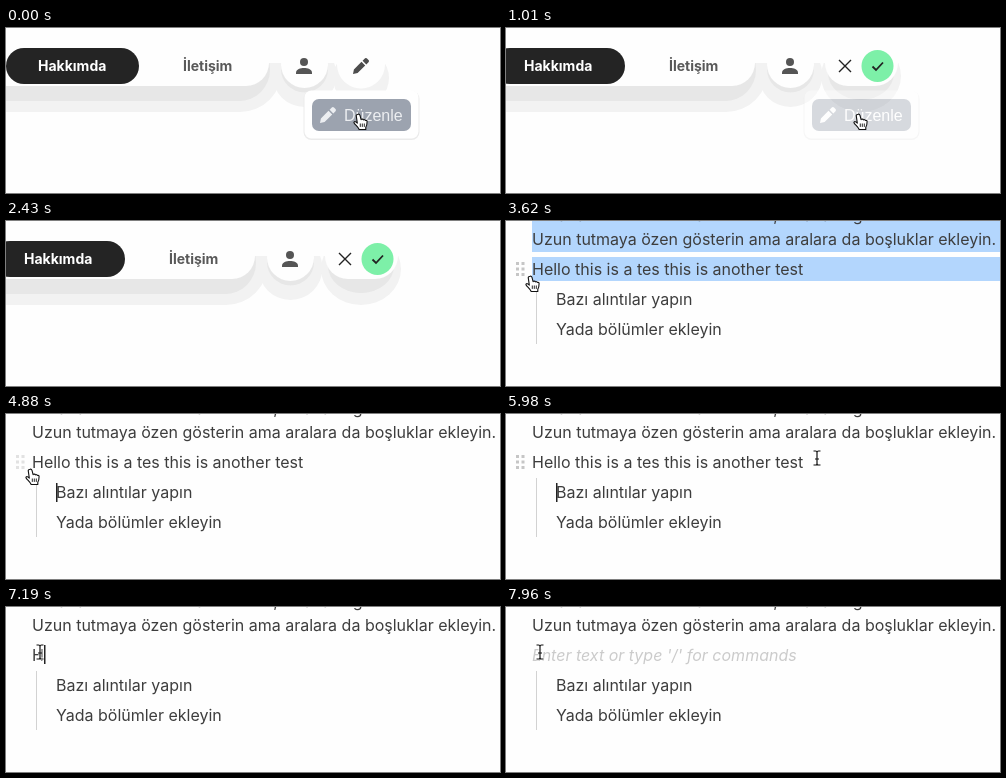
Animation, 494 px wide and 165 px high, one loop 8 s. Source, as an HTML page:

```html
<!DOCTYPE html>
<html lang="tr">
<head>
<meta charset="utf-8">
<title>Editör</title>
<style>
html, body { margin: 0; width: 100%; height: 100%; overflow: hidden; background: #fefefe; }
svg { display: block; width: 494px; height: 165px; font: 16px Inter, sans-serif; fill: #3d3d3d; }

/* One loop is 8 s, so 1% is 80 ms. */
svg [class] { animation: 8s step-end infinite; }

.light { fill: #f2f2f2; }
.dark { fill: #e7e7e7; }
.white { fill: #fefefe; }
.select { fill: #b3d6fd; }
.nav { font-weight: 700; font-size: 14px; }
svg .header { animation-name: header; }
svg .editor { animation-name: editor; }
svg .menu { animation-name: menu; }
svg .label { animation-name: label; }
svg .shift { animation-name: shift; }
svg .edit { animation-name: edit; }
svg .confirm { animation-name: confirm; }
svg .block { animation-name: block; }
svg .drag { animation-name: drag; }
svg .dragged { animation-name: dragged; }
svg .dots { animation-name: dots; }
svg .line { animation-name: line; }
svg .rest { animation-name: rest; }
svg .hint { animation-name: hint; }
svg .toolbar { animation-name: toolbar; }
svg .caret { animation-name: caret; }
svg .pointer { animation-name: pointer; }
svg .hand { animation-name: hand; }
svg .arrow { animation-name: arrow; }
svg .beam { animation-name: beam; }

@keyframes header { 0% { opacity: 1 } 45.25%, 100% { opacity: 0 } }
@keyframes editor { 0% { opacity: 0 } 45.25%, 100% { opacity: 1 } }
@keyframes menu { 0% { opacity: 1 } 12.625% { opacity: .4 } 13.375%, 100% { opacity: 0 } }
@keyframes label { 0% { fill: #eceef1 } .625%, 100% { fill: #fff } }
@keyframes shift { 0% { transform: none } 12.625%, 100% { transform: translate(-14px, 0) } }
@keyframes edit { 0% { opacity: 1 } 12.625%, 100% { opacity: 0 } }
@keyframes confirm { 0% { opacity: 0 } 12.625%, 100% { opacity: 1 } }

@keyframes block { 0% { opacity: 1 } 61%, 100% { opacity: 0 } }
@keyframes drag {
  0% { transform: translate(273px, 0) }
  76.9% { transform: translate(273px, 0); animation-timing-function: steps(10) }
  84.125%, 100% { transform: none }
}
@keyframes dragged { 0% { opacity: 1 } 89.875%, 100% { opacity: 0 } }
@keyframes dots {
  0% { opacity: 1 } 61% { opacity: .5 } 61.625% { opacity: 0 }
  67% { opacity: 1 } 89.875%, 100% { opacity: 0 }
}
@keyframes line { 0% { opacity: 1 } 91.4%, 100% { opacity: 0 } }
@keyframes rest { 0% { opacity: 1 } 89.875%, 100% { opacity: 0 } }
@keyframes hint { 0% { opacity: 0 } 91.4%, 100% { opacity: 1 } }
@keyframes toolbar {
  0% { opacity: 0 } 86.25% { opacity: .4 } 87% { opacity: .8 }
  87.625% { opacity: 1 } 89.875%, 100% { opacity: 0 }
}
@keyframes caret {
  0% { opacity: 0; transform: translate(50px, 69px) }
  61% { opacity: 1; transform: translate(50px, 69px) }
  67.75% { opacity: .5; transform: translate(50px, 69px) }
  68.5% { opacity: 0; transform: translate(50px, 69px) }
  74% { opacity: 1; transform: translate(50px, 69px) }
  76.125% { opacity: 1; transform: translate(300px, 38.5px) }
  77.625% { opacity: 0; transform: translate(300px, 38.5px) }
  89.875% { opacity: 1; transform: translate(38px, 38.5px) }
  91.4% { opacity: 1; transform: translate(26px, 38.5px) }
  98.75% { opacity: .5; transform: translate(26px, 38.5px) }
  99.5%, 100% { opacity: 0; transform: translate(26px, 38.5px) }
}
@keyframes pointer {
  0% { transform: translate(347px, 85px) }
  22.375% { transform: translate(349px, 86px); animation-timing-function: linear }
  23.75% { transform: translate(348px, 91px) }
  26.9% { transform: translate(348px, 91px); animation-timing-function: linear }
  29.6% { transform: translate(223px, 137px); animation-timing-function: linear }
  30.375% { transform: translate(180px, 190px) }
  45.25% { transform: translate(19px, 54px) }
  66.3% { transform: translate(19px, 54px); animation-timing-function: linear }
  68% { transform: translate(60px, 25px); animation-timing-function: linear }
  69.8% { transform: translate(125px, -10px); animation-timing-function: linear }
  71.5% { transform: translate(230px, -12px); animation-timing-function: linear }
  73.1% { transform: translate(298px, 20px); animation-timing-function: linear }
  74.5% { transform: translate(311px, 44px) }
  76.9% { transform: translate(311px, 44px); animation-timing-function: steps(10) }
  84.125%, 100% { transform: translate(34px, 45px) }
}
@keyframes hand { 0% { opacity: 1 } 22.375% { opacity: 0 } 45.25% { opacity: 1 } 67.5%, 100% { opacity: 0 } }
@keyframes arrow { 0% { opacity: 0 } 22.375% { opacity: 1 } 45.25%, 100% { opacity: 0 } }
@keyframes beam { 0% { opacity: 0 } 67.5%, 100% { opacity: 1 } }
</style>
</head>
<body>
<svg viewBox="0 0 494 165">
  <defs>
    <clipPath id="below"><path d="M0 35H494V165H0z"/></clipPath>
    <clipPath id="lineBox"><path d="M26 38H300V58H26z"/></clipPath>
    <path id="pencil" d="M0 16l.9-4.6 7.6-7.6 3.7 3.7-7.6 7.6zM9.6 2.7l2.2-2.2a1.6 1.6 0 0 1 2.2 0l1.5 1.5a1.6 1.6 0 0 1 0 2.2l-2.2 2.2z"/>
    <path id="dotRow" d="M10 0h3v3h-3zM15.5 0h3v3h-3z"/>
  </defs>

  <g class="header">
    <g clip-path="url(#below)">
      <g class="shift">
        <g class="light">
          <rect x="-60" y="0" width="336" height="84" rx="42"/>
          <circle cx="298.5" cy="47" r="32"/>
        </g>
        <g class="dark">
          <rect x="-60" y="10" width="324" height="63" rx="31"/>
          <circle cx="298.5" cy="41" r="23.5"/>
        </g>
        <g class="white">
          <rect x="-60" y="12" width="323" height="46" rx="23"/>
          <circle cx="298.5" cy="36.5" r="23.5"/>
        </g>
      </g>
      <g class="edit">
        <circle class="light" cx="355" cy="50" r="28"/>
        <circle class="white" cx="355" cy="36.5" r="24"/>
      </g>
      <g class="confirm">
        <ellipse class="light" cx="355" cy="48" rx="40" ry="36"/>
        <ellipse class="dark" cx="355" cy="45" rx="33" ry="27"/>
        <rect class="white" x="319" y="12" width="73" height="46" rx="23"/>
      </g>
    </g>

    <g class="shift">
      <rect y="20" width="133" height="36" rx="18" fill="#242424"/>
      <g class="nav">
        <text x="32" y="43" fill="#fff">Hakkımda</text>
        <text x="177" y="43" fill="#595959">İletişim</text>
      </g>
      <g transform="translate(298 38)" fill="#555">
        <circle cy="-4" r="4"/>
        <path d="M-8 8V6.5C-8 3.3-3.5 2 0 2S8 3.3 8 6.5V8z"/>
      </g>
    </g>
    <use class="edit" href="#pencil" x="347" y="30" fill="#4d4d4d"/>
    <g class="confirm" fill="none" stroke="#222" stroke-width="1.4">
      <path d="M333 32l12 12M345 32l-12 12"/>
      <circle cx="371.5" cy="38" r="16" fill="#7df0a8" stroke="none"/>
      <path d="M366.5 38.5l3.5 3.5 7-7.5" stroke-width="1.8"/>
    </g>

    <g class="menu">
      <rect x="297.5" y="63" width="116" height="49" rx="8" fill="#ebebeb"/>
      <rect x="298.5" y="62.5" width="114" height="48" rx="7" fill="#fff"/>
      <rect x="306" y="71" width="99" height="32" rx="7" fill="#9ca3af"/>
      <g class="label">
        <use href="#pencil" x="314" y="79"/>
        <text x="338" y="93" font-family="Liberation Sans, Arial, sans-serif">Düzenle</text>
      </g>
    </g>
  </g>

  <g class="editor">
    <rect width="494" height="165" fill="#fefefe"/>
    <path class="block select" style="animation-name:block" d="M26 0H494V31H26zM26 36H494V60H26z"/>
    <g class="dragged" clip-path="url(#lineBox)">
      <rect class="drag select" style="animation-name:drag" x="38" y="38" width="300" height="20"/>
    </g>
    <text x="26" y="0">Burada kendinizden bahsedelim, kısaca bilgiler.</text>
    <text x="26" y="24">Uzun tutmaya özen gösterin ama aralara da boşluklar ekleyin.</text>
    <text class="line" x="26" y="54">H<tspan class="rest">ello this is a tes this is another test</tspan></text>
    <text class="hint" x="26" y="54" font-style="italic" fill="#cbcbcb">Enter text or type '/' for commands</text>
    <text x="50" y="84">Bazı alıntılar yapın</text>
    <text x="50" y="114">Yada bölümler ekleyin</text>
    <path d="M30.5 64V123" stroke="#d2d2d2"/>
    <g class="dots" fill="#c6c6c6">
      <use href="#dotRow" y="41"/>
      <use href="#dotRow" y="46.5"/>
      <use href="#dotRow" y="52"/>
    </g>
    <rect class="toolbar" x="38.5" y="-20" width="470" height="46" rx="4" fill="#fff" stroke="#e6e6e6"/>
    <rect class="caret" width="1.5" height="19" fill="#222"/>
  </g>

  <g class="pointer">
    <g class="hand" fill="#fff" stroke="#111" stroke-width="1.1" stroke-linejoin="round">
      <path d="M5 1.2c.9-.3 1.7.3 2 1.2l1.1 4.2c.4-.7 2-.7 2.3.3.6-.5 1.9-.3 2.1.6.7-.3 1.6.1 1.6 1.1 0 2.6-.2 4-1.3 5.6v2.3H6.2c-.7-1.9-2.7-3.6-4.9-6.2-.9-1.1.2-2.2 1.5-1.4l1.5 1.2L3.3 3.1c-.3-1 .6-1.7 1.7-1.9z"/>
      <path d="M7.3 10.5v3.4M9.3 10.5v3.4M11.3 10.5v3.4" stroke-width=".9"/>
    </g>
    <path class="arrow" d="M.5 0V14.5L3.8 11.4 6 16.8 8.3 15.8 6.1 10.5H10.4z" fill="#000" stroke="#fff"/>
    <g class="beam" fill="none">
      <path id="ibeam" d="M-3.5-7H-1.5Q0-7 0-5.5Q0-7 1.5-7H3.5M0-5.5V5.5M-3.5 7H-1.5Q0 7 0 5.5Q0 7 1.5 7H3.5" stroke="#fff" stroke-width="2.6"/>
      <use href="#ibeam" stroke="#111"/>
      <path d="M-3.5-7H-1.5Q0-7 0-5.5Q0-7 1.5-7H3.5M0-5.5V5.5M-3.5 7H-1.5Q0 7 0 5.5Q0 7 1.5 7H3.5M-2 1H2" stroke="#111" stroke-width="1.2"/>
    </g>
  </g>
</svg>
</body>
</html>
```
